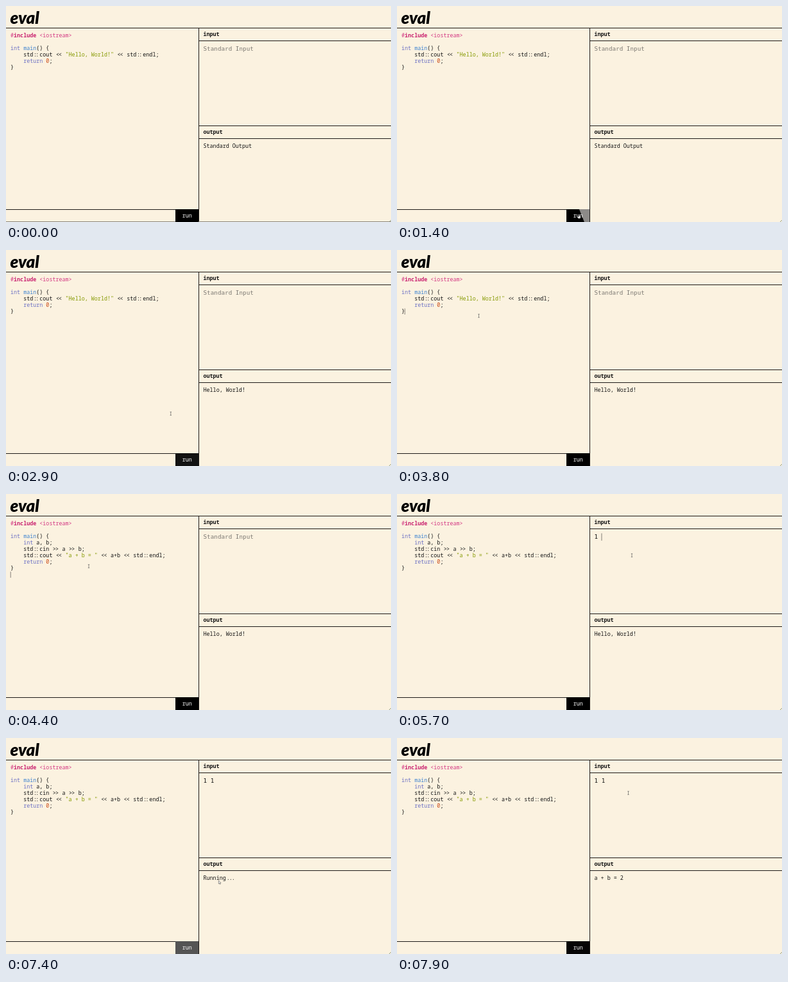
These frames come from a looping animation (600x338 px, 8000 ms). An HTML page:

```html
<!DOCTYPE html>
<html lang="en">
<head>
<meta charset="utf-8">
<title>eval</title>
<style>
  html, body { margin: 0; width: 100%; height: 100%; overflow: hidden; background: #fbf2e0; }
  svg { display: block; width: 100vw; height: 100vh; }
  text { font: 8.4px "Noto Sans Mono", "DejaVu Sans Mono", monospace; fill: #141414; white-space: pre; }
  .title { font: italic 900 26px Lato, "Open Sans", sans-serif; fill: #000; }
  .bold { font-weight: 700; }
  .field { font: 9.27px "DejaVu Sans Mono", monospace; }
  .hint { fill: #7d7a73; }
  .hash { fill: #d33682; }
  .include { fill: #c9216f; font-weight: 700; }
  .header { fill: #d33682; }
  .keyword { fill: #6c71c4; }
  .func { fill: #3a80d0; }
  .string { fill: #859900; }
  .number { fill: #cb4b16; }
  .rule { fill: none; stroke: #1c1a18; }
  .caret { stroke: #333; stroke-width: .6; }
</style>
</head>
<body>
<svg viewBox="0 0 600 338" preserveAspectRatio="none">
  <defs><clipPath id="buttonClip"><rect x="264" y="318" width="36" height="20"/></clipPath></defs>
  <rect width="600" height="338" fill="#fbf2e0"/>
  <text class="title" x="6.5" y="27.5">eval</text>
  <path class="rule" d="M0 34.5H600M300.5 34V338M300 54.5H600M300 187.5H600M300 207.5H600M0 318.5H300"/>
  <path id="edge" d="M0 337.5H600" stroke="#8b867c"/>
  <path id="grip" d="M597 338L600 335" stroke="#7c8a6c" stroke-width=".8"/>
  <text class="bold" x="307.5" y="46.5">input</text>
  <text class="bold" x="307.5" y="200">output</text>
  <g id="codeA"></g>
  <g id="codeB"></g>
  <text id="input" class="field" x="307.5" y="70.2"></text>
  <text id="output" x="307.5" y="222.3"></text>
  <path id="editorCaret" class="caret"/>
  <path id="inputCaret" class="caret"/>
  <g clip-path="url(#buttonClip)">
    <rect id="button" x="264" y="318" width="36" height="20"/>
    <path id="wipe" fill="#8c8a88"/>
  </g>
  <text x="274.7" y="331" style="fill:#fff">run</text>
  <g id="pointer">
    <path id="arrow" d="M0 0V5.2L1.2 4.2L2 6L2.9 5.6L2.1 3.9H3.7Z" fill="#fff" stroke="#333" stroke-width=".5"/>
    <path id="beam" d="M-1.2 -2.6H1.2M0 -2.6V2.6M-1.2 2.6H1.2" fill="none" stroke="#555" stroke-width=".65"/>
    <path id="hand" d="M-.6 -2.8Q0 -3.5 .6 -2.8V-.6L2.4 0Q2.9 .3 2.7 1.2L2 3.5H-1L-2.7 .9Q-2.5 .1 -1.4 .6L-.6 1.2Z" fill="#fff" stroke="#222" stroke-width=".35"/>
  </g>
</svg>
<script>
const LOOP = 8000;
const $ = id => document.getElementById(id);
const SVG = "http://www.w3.org/2000/svg";
const clamp = v => Math.max(0, Math.min(1, v));
const mix = (a, b, p) => a + (b - a) * p;
const during = (t, from, to) => t >= from && t < to;
const show = (id, on) => $(id).setAttribute("visibility", on ? "visible" : "hidden");

const hello = `#include <iostream>

int main() {
    std::cout << "Hello, World!" << std::endl;
    return 0;
}`;
const sum = `#include <iostream>

int main() {
    int a, b;
    std::cin >> a >> b;
    std::cout << "a + b = " << a+b << std::endl;
    return 0;
}`;

const syntax = /(?<string>"[^"]*")|(?<hash>#)|(?<include>include)|(?<header><\w+>)|(?<keyword>\b(?:int|return)\b)|(?<func>\bmain\b)|(?<number>\b0\b)/g;

function addSpan(parent, text, className) {
  if (!text) return;
  const span = document.createElementNS(SVG, "tspan");
  span.textContent = text;
  if (className) span.setAttribute("class", className);
  parent.append(span);
}

// Pulls the glyphs of operators together, as a coding font's ligatures do.
function tighten(node, text) {
  const dx = Array(text.length + 1).fill(0);
  for (const { 0: op, index } of text.matchAll(/::|<<|>>|\.\.\./g)) {
    const shift = op === "::" ? .9 : op === "..." ? 1 : .45;
    dx[index] += shift;
    for (let i = 1; i < op.length; i++) dx[index + i] -= 2 * shift / (op.length - 1);
    dx[index + op.length] += shift;
  }
  node.setAttribute("dx", dx.slice(0, text.length).join(" "));
}

function buildCode(group, source) {
  source.split("\n").forEach((line, row) => {
    const text = document.createElementNS(SVG, "text");
    text.setAttribute("x", 7);
    text.setAttribute("y", 48.9 + row * 10);
    let end = 0;
    for (const match of line.matchAll(syntax)) {
      addSpan(text, line.slice(end, match.index));
      addSpan(text, match[0], Object.keys(match.groups).find(k => match.groups[k]));
      end = match.index + match[0].length;
    }
    addSpan(text, line.slice(end));
    tighten(text, line);
    group.append(text);
  });
}

function setText(id, value) {
  const node = $(id);
  if (node.textContent === value) return;
  node.textContent = value;
  tighten(node, value);
}

// time, x, y
const route = [
  [300, 520, 230], [1000, 347, 297], [1350, 283.5, 329], [2000, 283.5, 329],
  [2300, 266, 274.5], [2800, 262, 262], [3600, 143, 125], [3800, 127.5, 103],
  [4200, 127.5, 103], [4400, 129, 113], [4900, 364, 110], [5100, 366, 96],
  [5900, 366, 96], [6700, 283.5, 329], [7100, 283.5, 329], [7600, 357, 166],
  [7800, 360.5, 86], [8000, 360.5, 86]
];

function pointerAt(t) {
  const i = Math.max(1, route.findIndex(k => k[0] > t));
  const [t0, x0, y0] = route[i - 1], [t1, x1, y1] = route[i];
  const p = clamp((t - t0) / (t1 - t0));
  const eased = p * p * (3 - 2 * p);
  return [mix(x0, x1, eased), mix(y0, y1, eased)];
}

function drawPointer(t) {
  const [x, y] = pointerAt(t);
  const kind = y > 318 && x > 264 && x < 300 ? "hand"
    : during(t, 2650, 6600) || t > 7550 ? "beam" : "arrow";
  for (const id of ["arrow", "beam", "hand"]) show(id, t >= 300 && id === kind);
  $("pointer").setAttribute("transform", `translate(${x.toFixed(2)} ${y.toFixed(2)})`);
}

function drawButton(t) {
  const second = t >= 6000;
  const [hover, click, done] = second ? [6740, 7000, 7600] : [1310, 1850, 2650];
  const waiting = clamp((t - click) / 150) * (1 - clamp((t - done) / 320));
  const level = Math.round(84 * waiting);
  $("button").setAttribute("fill", `rgb(${level},${level},${level})`);
  const top = 300 - 46 * clamp((t - hover) / 260);
  $("wipe").setAttribute("d", `M${top} 318H302V338H${top + 8}Z`);
  show("wipe", t > hover && t < click + 50 && top < 300);
}

function outputAt(t) {
  if (t < 1950) return "Standard Output";
  if (t < 2600) return "Running...";
  if (t < 7100) return "Hello, World!";
  return t < 7600 ? "Running..." : "a + b = 2";
}

function draw(t) {
  show("edge", t < 100);
  show("codeA", t < 4200);
  show("codeB", t >= 4200);

  const typed = t < 5400 ? "" : t < 5700 ? "1" : t < 5900 ? "1 " : "1 1";
  setText("input", typed || "Standard Input");
  $("input").setAttribute("class", typed ? "field" : "field hint");
  setText("output", outputAt(t));

  $("editorCaret").setAttribute("d", t < 4200 ? "M12.2 91.5V101" : "M7.2 121.5V131");
  show("editorCaret", during(t, 3700, 5000));
  const caretX = 307.8 + typed.length * 5.58;
  $("inputCaret").setAttribute("d", `M${caretX} 61.5V73`);
  show("inputCaret", during(t, 5100, 6400));

  drawButton(t);
  drawPointer(t);
}

buildCode($("codeA"), hello);
buildCode($("codeB"), sum);

const start = performance.now();
function tick() {
  draw((performance.now() - start) % LOOP);
  requestAnimationFrame(tick);
}
draw(0);
requestAnimationFrame(tick);
</script>
</body>
</html>
```
